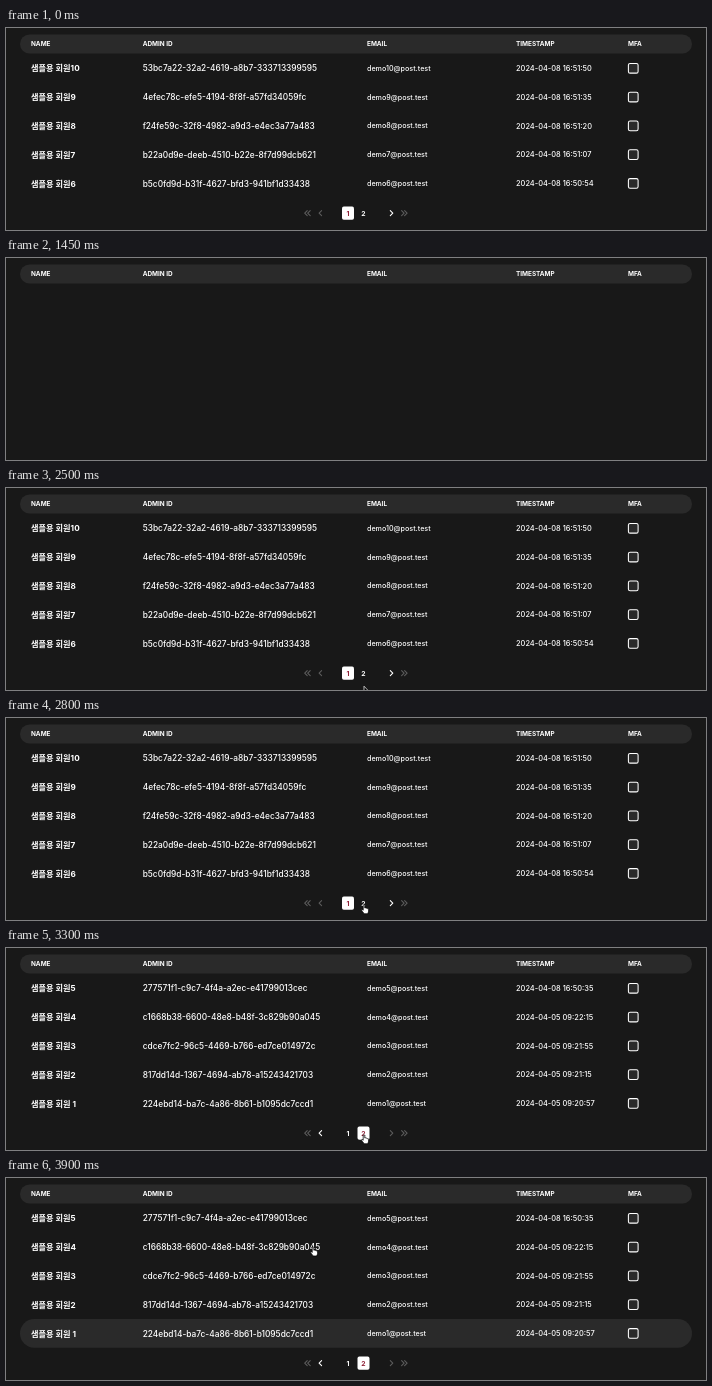
An HTML page for the animation above (3.95 s loop, 700x202 px).

```html
<!DOCTYPE html>
<html lang="ko">
<head>
<meta charset="utf-8">
<title>Account table</title>
<style>
  html, body { margin: 0; width: 100%; height: 100%; overflow: hidden; background: #181818; }
  svg { display: block; width: 100%; height: 100%; }
  text { font-family: Inter, "Noto Sans CJK KR", "Noto Sans CJK", sans-serif; fill: #fff; white-space: pre; }
  .head { font-size: 6.4px; font-weight: 700; }
  .name { font-size: 8.2px; font-weight: 700; }
  .id { font-size: 8.33px; font-weight: 500; }
  .mail { font-size: 7.15px; font-weight: 500; }
  .time { font-size: 7.45px; font-weight: 500; }
  .page { font-size: 6.8px; font-weight: 700; text-anchor: middle; }
  .chevron { fill: none; stroke-width: 1.1; stroke-linecap: round; stroke-linejoin: round; }
</style>
</head>
<body>
<svg id="stage" viewBox="0 0 700 202"></svg>
<script>
const LOOP = 3950, STEP = 50;
const ROW_TOP = 26, ROW_H = 28.8;
const DIM = '#5c5c5c', LIT = '#fff', RED = '#8f1f36';
const COLS = { name: 25, id: 136.7, mail: 361, time: 510, mfa: 622 };

const PAGES = [
  [
    ['10', '53bc7a22-32a2-4619-a8b7-333713399595', '2024-04-08 16:51:50'],
    ['9', '4efec78c-efe5-4194-8f8f-a57fd34059fc', '2024-04-08 16:51:35'],
    ['8', 'f24fe59c-32f8-4982-a9d3-e4ec3a77a483', '2024-04-08 16:51:20'],
    ['7', 'b22a0d9e-deeb-4510-b22e-8f7d99dcb621', '2024-04-08 16:51:07'],
    ['6', 'b5c0fd9d-b31f-4627-bfd3-941bf1d33438', '2024-04-08 16:50:54']
  ],
  [
    ['5', '277571f1-c9c7-4f4a-a2ec-e41799013cec', '2024-04-08 16:50:35'],
    ['4', 'c1668b38-6600-48e8-b48f-3c829b90a045', '2024-04-05 09:22:15'],
    ['3', 'cdce7fc2-96c5-4469-b766-ed7ce014972c', '2024-04-05 09:21:55'],
    ['2', '817dd14d-1367-4694-ab78-a15243421703', '2024-04-05 09:21:15'],
    [' 1', '224ebd14-ba7c-4a86-8b61-b1095dc7ccd1', '2024-04-05 09:20:57']
  ]
];

// Pointer positions after the page switch, one per step
const EXIT_START = 3700;
const EXIT = [[350, 190.5], [322, 191], [283, 188], [253, 175], [307, 69]];

function add(parent, tag, attrs, content) {
  const el = document.createElementNS('http://www.w3.org/2000/svg', tag);
  for (const key in attrs) el.setAttribute(key, attrs[key]);
  if (content !== undefined) el.textContent = content;
  parent.appendChild(el);
  return el;
}
const label = (parent, cls, x, y, content) => add(parent, 'text', { class: cls, x, y }, content);
const show = (el, on) => el.setAttribute('visibility', on ? 'visible' : 'hidden');

const stage = document.getElementById('stage');
add(stage, 'rect', { width: 700, height: 202, fill: '#181818' });
add(stage, 'rect', { x: 14, y: 6.4, width: 672, height: 19.2, rx: 9.6, fill: '#2a2a2a' });
const titles = { name: 'NAME', id: 'ADMIN ID', mail: 'EMAIL', time: 'TIMESTAMP', mfa: 'MFA' };
for (const key in titles) label(stage, 'head', COLS[key], 18.3, titles[key]);

const hover = add(stage, 'rect', {
  x: 14, y: ROW_TOP + 4 * ROW_H - 0.2, width: 672, height: ROW_H, rx: ROW_H / 2, fill: '#2a2a2a'
});

function buildRows(rows) {
  const group = add(stage, 'g', {});
  rows.forEach(([no, id, time], i) => {
    const mid = ROW_TOP + (i + 0.5) * ROW_H;
    label(group, 'name', COLS.name, mid + 2.9, '샘플용 회원' + no);
    label(group, 'id', COLS.id, mid + 3, id);
    label(group, 'mail', COLS.mail, mid + 2.4, `demo${no.trim()}@post.test`);
    label(group, 'time', COLS.time, mid + 2.6, time);
    add(group, 'rect', {
      x: 622.4, y: mid - 5, width: 9.7, height: 9.7, rx: 1.7,
      fill: '#2a2a2a', stroke: '#fff', 'stroke-width': 1.05
    });
  });
  return group;
}
const tables = PAGES.map(buildRows);

const pager = add(stage, 'g', {});
function chevron(x, dir, count) {
  let d = '';
  for (let i = 0; i < count; i++) d += `M${x + i * 3} 182.6l${2.5 * dir} 2.5l${-2.5 * dir} 2.5`;
  return add(pager, 'path', { class: 'chevron', d, stroke: DIM });
}
chevron(301.2, -1, 2);
const prev = chevron(315.6, -1, 1);
const next = chevron(384.3, 1, 1);
chevron(395.6, 1, 2);
const chip = add(pager, 'rect', { y: 178.6, width: 12, height: 13.2, rx: 1.8, fill: '#fff' });
const numbers = [342, 357.5].map((x, i) => label(pager, 'page', x, 187.6, i + 1));

const arrow = add(stage, 'path', {
  d: 'M0 0V7.6L1.8 6L3 8.8L4.2 8.3L3 5.6H5.3Z',
  fill: '#000', stroke: '#fff', 'stroke-width': 0.7, 'stroke-linejoin': 'round'
});
const hand = add(stage, 'path', {
  d: 'M-.8 .7Q-.8 0 0 0T.8 .7V3.2Q1.7 2.7 2.1 3.4Q3 3 3.4 3.8Q4.6 3.5 4.6 4.8V6.3' +
     'Q4.6 7.4 3.9 8.2V9H-.3V8.3Q-1.6 7 -2.6 5.3Q-2.3 4.2 -1.2 5L-.8 5.4Z',
  fill: '#fff', stroke: '#000', 'stroke-width': 0.75, 'stroke-linejoin': 'round'
});

function pointer(t) {
  if (t < 2500) return null;
  if (t < EXIT_START) {
    const p = Math.min(1, Math.floor((t - 2500) / STEP) / 6);
    const y = 198.2 - 11.4 * p * (2 - p);
    return { x: 358, y, hand: y < 192 };
  }
  const i = Math.min(EXIT.length - 1, Math.floor((t - EXIT_START) / STEP));
  return { x: EXIT[i][0], y: EXIT[i][1], hand: i === 0 || i === EXIT.length - 1 };
}

function draw(t) {
  const loading = t >= 1450 && t < 1500;
  const page = t < 3250 ? 0 : 1;
  const data = t < 3300 ? 0 : 1;

  tables.forEach((table, i) => show(table, !loading && i === data));
  show(pager, !loading);
  show(hover, t >= 3900);

  chip.setAttribute('x', page ? 351.5 : 336);
  numbers.forEach((n, i) => { n.style.fill = i === page ? RED : LIT; });
  prev.setAttribute('stroke', page ? LIT : DIM);
  next.setAttribute('stroke', page ? DIM : LIT);

  const at = pointer(t);
  show(arrow, at && !at.hand);
  show(hand, at && at.hand);
  if (at) (at.hand ? hand : arrow).setAttribute('transform', `translate(${at.x} ${at.y})`);
}

const start = performance.now();
function tick() {
  draw((performance.now() - start) % LOOP);
  requestAnimationFrame(tick);
}
tick();
</script>
</body>
</html>
```
